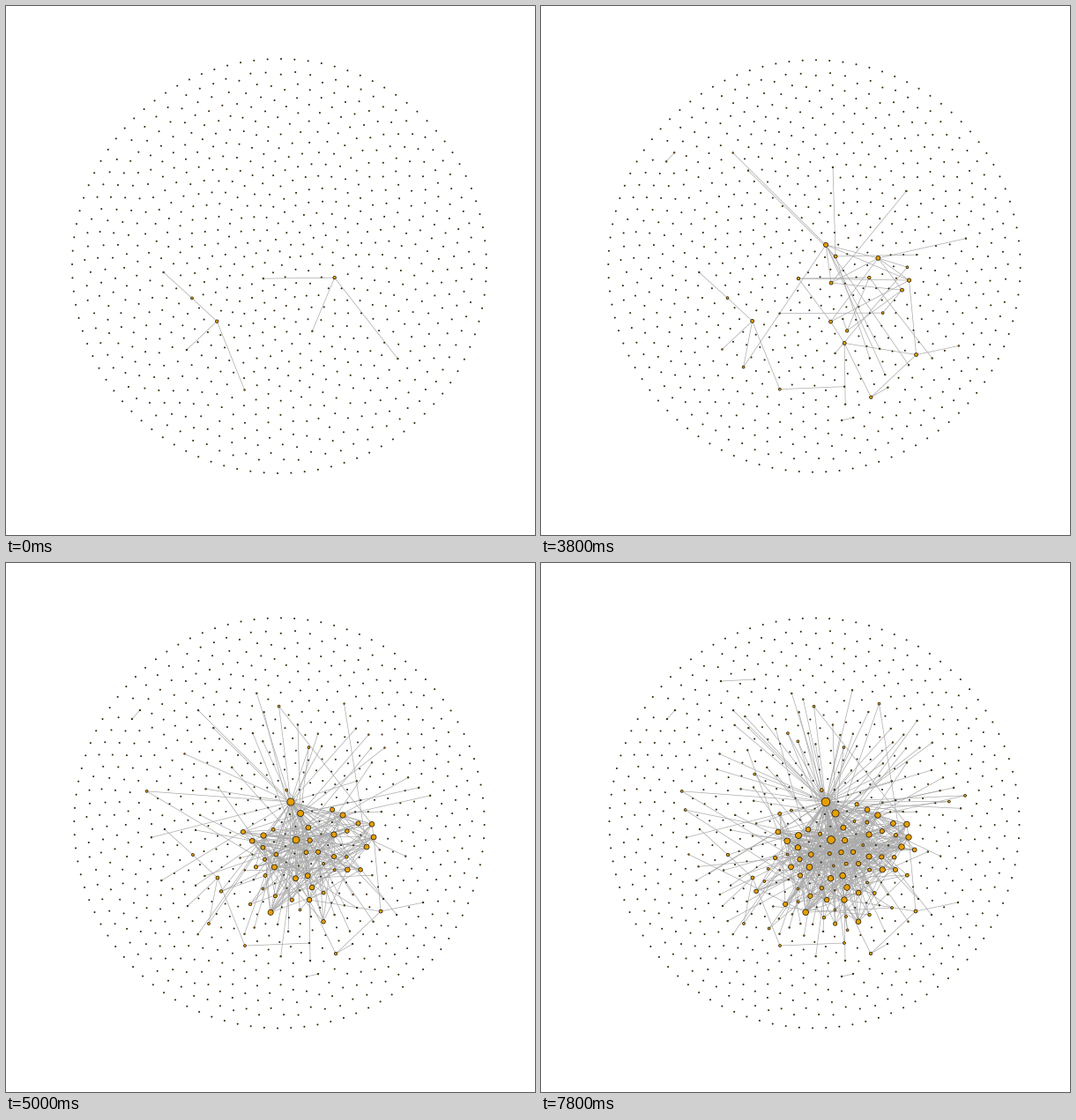
A matplotlib script for the animation above (8 s loop, 600 by 600 pixels).

```python
import random

import matplotlib.pyplot as plt
import numpy as np
from matplotlib.animation import FuncAnimation
from matplotlib.collections import LineCollection

SIZE, DPI, FRAMES, STEP = 600, 100, 40, 200
CENTER = np.array([310, 295])
RADIUS = 232.5
BLOOM = 18          # frame at which the dense core starts to form

# the sparse network of the opening, then the main hubs
KEYS = np.array([
    (180, 302), (212, 331), (240, 357), (206, 389), (271, 434),
    (292, 309), (372, 308), (347, 368), (443, 399), (230, 409),
    (344, 431), (344, 382), (345, 451), (374, 443), (425, 395),
    (393, 432), (417, 311), (473, 385), (341, 469), (354, 466),
    (323, 271), (329, 314), (334, 284), (382, 286), (409, 322),
    (152, 167), (143, 177), (204, 134), (242, 132)])
TRUNK = [20, 21, 22]
FIRST_HUBS = [24, 23, 6, 16, 7, 5, 11]

LINKS = {
    0: [(0, 1), (1, 2), (2, 3), (2, 4), (5, 6), (6, 7), (6, 8)],
    1: [(2, 9), (4, 10)],
    2: [(11, 12), (11, 13)],
    3: [(11, 14)],
    4: [(13, 14), (13, 15)],
    5: [(14, 16)],
    10: [(14, 17)],
    11: [(18, 19)],
    18: [(20, 21), (20, 23), (21, 24), (25, 26)],
    31: [(27, 28)],
}

rng = random.Random(4)


def ring(radius, count, shift):
    t = (np.arange(count) + shift) * 2 * np.pi / count - np.pi / 2
    return CENTER + radius * np.column_stack([np.cos(t), np.sin(t)])


def fill(fixed, count=715, reach=RADIUS - 14, rounds=70):
    """Spread loose dots evenly between the fixed ones."""
    n = np.arange(count)
    r, t = reach * ((n + .5) / count) ** .54, n * np.pi * (3 - 5 ** .5)
    dots = CENTER + np.column_stack([r * np.cos(t), r * np.sin(t)])
    for p in fixed:
        if np.hypot(*(p - CENTER)) < reach:
            near = np.hypot(*(dots - p).T).argmin()
            dots = np.delete(dots, near, axis=0)
    same = np.arange(len(dots))
    for _ in range(rounds):
        every = np.vstack([dots, fixed])
        dx = dots[:, :1] - every[:, 0]
        dy = dots[:, 1:] - every[:, 1]
        dist = np.hypot(dx, dy) + 1e-6
        dist[same, same] = 1e6
        r = np.hypot(*(dots - CENTER).T)
        gap = (14 + 4 * r / reach)[:, None]
        push = .25 * gap * np.clip(1 - dist / gap, 0, 1) / dist
        dots = dots + np.column_stack([(dx * push).sum(1), (dy * push).sum(1)])
        off = dots - CENTER
        r = np.hypot(*off.T)
        dots = CENTER + off * np.minimum(1, reach / r)[:, None]
    return dots


fixed = np.vstack([KEYS, ring(RADIUS, 96, .13)])
spots = np.vstack([fixed, fill(fixed)])


def pick(x, y, rx, ry, inner=0):
    """Dot nearest to a random place in an ellipse."""
    t = rng.uniform(0, 2 * np.pi)
    r = rng.uniform(inner, 1) ** .6
    place = (x + rx * r * np.cos(t), y + ry * r * np.sin(t))
    return int(np.hypot(*(spots - place).T).argmin())


def grow():
    """List (frame, a, b) for every edge, hubs joining one by one."""
    edges = {tuple(sorted(p)): f for f, pairs in LINKS.items() for p in pairs}
    hubs = list(FIRST_HUBS)
    while len(hubs) < 75:
        h = pick(332, 335, 102, 76)
        if h not in hubs + TRUNK:
            hubs.append(h)

    for f in range(BLOOM, FRAMES):
        total = int(np.interp(f, [17, 19, 23, 28, 39], [20, 48, 195, 335, 450]))
        known = int(np.interp(f, [18, 23, 28, 39], [8, 40, 60, 75]))
        while len(edges) < total:
            any_hub = hubs[int(known * rng.random() ** 1.25)]
            if rng.random() < .25:
                a = pick(318, 292, 165, 160, .25)
                b = rng.choices(TRUNK + [any_hub], [45, 20, 10, 25])[0]
            else:
                a = hubs[rng.randrange(known)]
                b = rng.choices(TRUNK + [any_hub], [9, 11, 7, 73])[0]
            if a != b:
                edges.setdefault((min(a, b), max(a, b)), f)
    return np.array([(f, a, b) for (a, b), f in edges.items()])


edges = grow()

fig = plt.figure(figsize=(SIZE / DPI, SIZE / DPI), dpi=DPI, facecolor="white")
ax = fig.add_axes([0, 0, 1, 1])
ax.set(xlim=(0, SIZE), ylim=(SIZE, 0))
ax.axis("off")
lines = LineCollection([], colors="#a9a9a9", linewidths=.5, zorder=1)
ax.add_collection(lines)
dots = ax.scatter(*spots.T, s=1, c="#e69f00", edgecolors="#151000",
                  linewidths=.5, zorder=2)


def draw(f):
    # the layout shrinks a little as the hubs swell
    scale = np.interp(f, [17, 19, 23, 28], [1.0105, 1.005, 1.001, 1])
    places = CENTER + (spots - CENTER) * scale
    ends = edges[edges[:, 0] <= f, 1:]
    degree = np.bincount(ends.ravel(), minlength=len(spots))
    radii = np.maximum(.62, .3 + 1.02 * np.log1p(degree))
    radii[degree == 1] = .8
    dots.set_offsets(places)
    dots.set_sizes((2 * radii * 72 / DPI) ** 2)
    lines.set_segments(list(places[ends]))
    return lines, dots


anim = FuncAnimation(fig, draw, frames=FRAMES, interval=STEP, repeat=True,
                     repeat_delay=0, blit=False)
plt.show()
```
